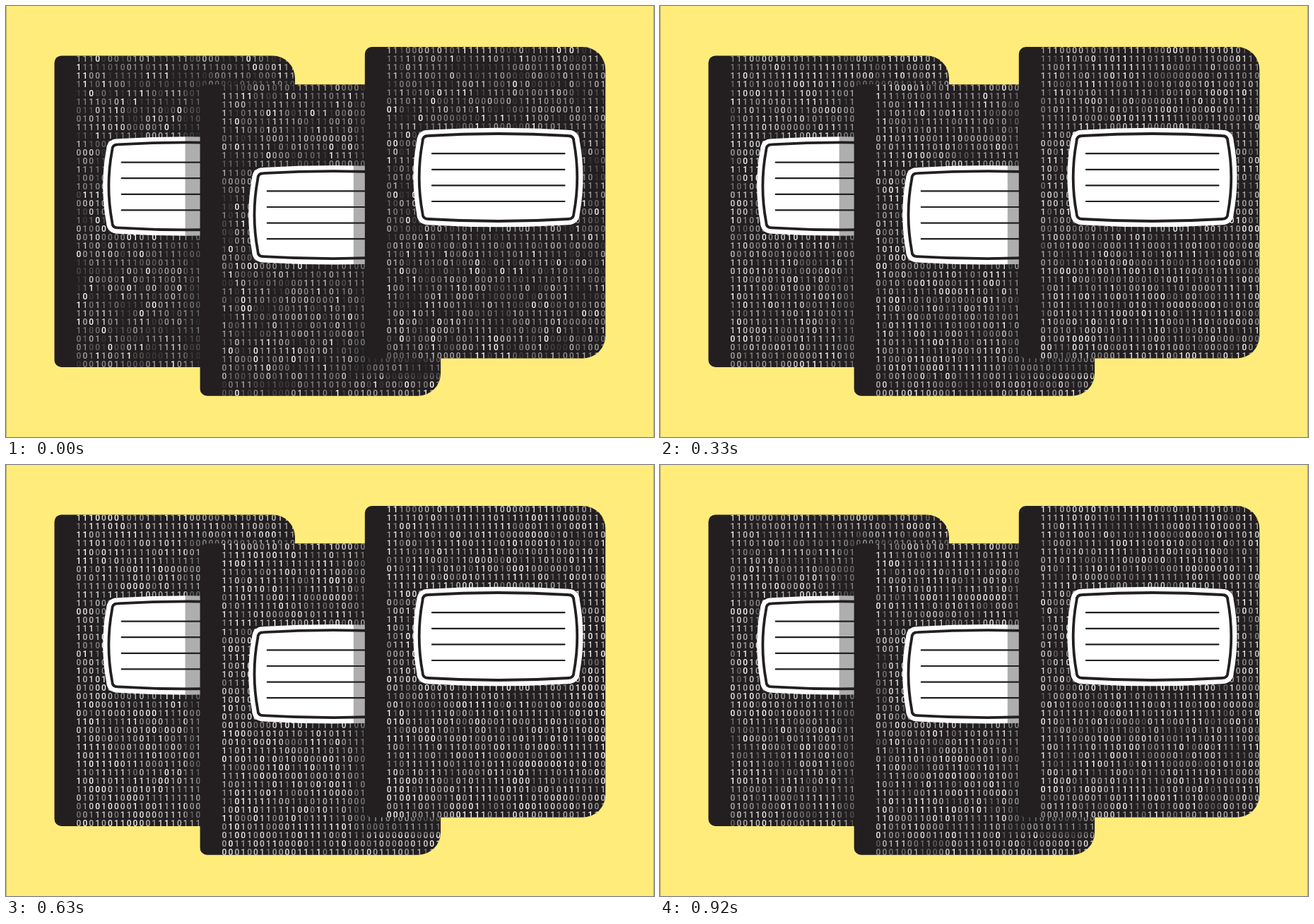
These frames come from a looping animation (917 px wide and 611 px high, 960 ms). An HTML page with a canvas:

```html
<!DOCTYPE html>
<html lang="en">
<head>
<meta charset="utf-8">
<title>Binary notebooks</title>
<style>
html, body { margin: 0; width: 100%; height: 100%; overflow: hidden; background: #ffec7b; }
canvas { display: block; width: 917px; height: 611px; }
</style>
</head>
<body>
<canvas id="stage" width="917" height="611"></canvas>
<script>
const LOOP = 960, STEPS = 23;
const COLS = 35, ROWS = 37, PITCH_X = 8.9, PITCH_Y = 12.03;
const INK = '#231f20', PAPER = '#ffec7b';
const BOOK_W = 340.5, BOOK_H = 441.5;
const ctx = document.getElementById('stage').getContext('2d');

const books = [
  { x: 68.5, y: 70.4, shade: 21 },
  { x: 274.6, y: 111.2, shade: 21 },
  { x: 507.8, y: 58, shade: 16 }
];

const cover = new Path2D();
cover.roundRect(0, 0, BOOK_W, BOOK_H, [10, 32, 32, 10]);
const label = barrel(188.7, 185, 107, 59, 8, 6);

// Rounded rectangle around (cx, cy) whose sides bulge outwards.
function barrel(cx, cy, w, h, r, bulge) {
  const p = new Path2D();
  const l = cx - w, t = cy - h, right = cx + w, b = cy + h;
  p.moveTo(l + r, t);
  p.quadraticCurveTo(cx, t - bulge, right - r, t);
  p.quadraticCurveTo(right, t, right, t + r);
  p.quadraticCurveTo(right + 1.6 * bulge, cy, right, b - r);
  p.quadraticCurveTo(right, b, right - r, b);
  p.quadraticCurveTo(cx, b + bulge, l + r, b);
  p.quadraticCurveTo(l, b, l, b - r);
  p.quadraticCurveTo(l - 1.6 * bulge, cy, l, t + r);
  p.quadraticCurveTo(l, t, l + r, t);
  p.closePath();
  return p;
}

// Repeatable random number in 0..1.
function rnd(a, b, c) {
  const n = Math.sin(a * 12.9898 + b * 78.233 + c * 37.719 + 4.1) * 43758.5453;
  return n - Math.floor(n);
}

// Random value that varies smoothly along a row.
function patch(col, row, seed) {
  const p = col / 3, i = Math.floor(p), f = p - i;
  const k = f * f * (3 - 2 * f);
  return rnd(i, row, seed) * (1 - k) + rnd(i + 1, row, seed) * k;
}

function makeCells(seed) {
  const cells = [];
  for (let r = 0; r < ROWS; r++) {
    for (let c = 0; c < COLS; c++) {
      cells.push({
        digit: patch(c, r, 9) + rnd(c, r, 10) < 1.04 ? '1' : '0',
        x: 34.4 + c * PITCH_X,
        y: 9 + r * PITCH_Y,
        phase: patch(c, r, seed) * 1.6,
        grain: rnd(c, r, seed + 20) - 0.5,
        spark: rnd(c, r, seed + 40) < 0.07
      });
    }
  }
  return cells;
}
books.forEach((b, i) => { b.cells = makeCells(i + 1); });

function drawDigits(cells, t) {
  const mean = 0.41 + 0.31 * Math.sin(2.5 * t / LOOP);
  const flash = Math.max(0, 1 - t / 200);
  ctx.font = '500 12px Roboto, "Liberation Sans", sans-serif';
  ctx.textAlign = 'center';
  ctx.fillStyle = '#fff';
  for (const c of cells) {
    const wave = Math.sin(2 * Math.PI * (t / LOOP + c.phase));
    let a = mean + 0.2 * wave + 0.4 * c.grain;
    if (c.spark) a += (1 - a) * flash;
    ctx.globalAlpha = Math.min(0.97, Math.max(0.12, a));
    ctx.fillText(c.digit, c.x, c.y);
  }
  ctx.globalAlpha = 1;
}

function drawLabel() {
  ctx.lineJoin = 'round';
  ctx.fillStyle = ctx.strokeStyle = '#fff';
  ctx.lineWidth = 16.5;
  ctx.stroke(label);
  ctx.fill(label);
  ctx.strokeStyle = INK;
  ctx.lineWidth = 3.8;
  ctx.stroke(label);
  ctx.lineWidth = 2.2;
  ctx.lineCap = 'round';
  ctx.beginPath();
  for (let i = 0; i < 4; i++) {
    const y = 151.2 + i * 22.6;
    ctx.moveTo(95.2, y);
    ctx.lineTo(282.7, y);
  }
  ctx.stroke();
}

function drawBook(book, above, t) {
  ctx.save();
  ctx.translate(book.x, book.y);
  ctx.fillStyle = INK;
  ctx.fill(cover);
  ctx.clip(cover);
  drawDigits(book.cells, t);
  drawLabel();
  if (above) {
    ctx.globalAlpha = 0.36;
    ctx.fillStyle = INK;
    ctx.fillRect(above.x - book.x - above.shade, above.y - book.y - 10, BOOK_W + above.shade, BOOK_H + 35);
  }
  ctx.restore();
}

function draw(t) {
  ctx.fillStyle = PAPER;
  ctx.fillRect(0, 0, 917, 611);
  ctx.fillStyle = '#b9ac66';
  ctx.fillRect(0, 0, 1, 611);
  ctx.fillRect(916, 0, 1, 611);
  books.forEach((b, i) => drawBook(b, books[i + 1], t));
}

const stepStart = i => 10 * Math.round(i * LOOP / STEPS / 10);
let shown = -1;

function tick() {
  const t = performance.now() % LOOP;
  let step = STEPS - 1;
  while (stepStart(step) > t) step--;
  if (step !== shown) {
    draw(stepStart(step));
    shown = step;
  }
  requestAnimationFrame(tick);
}
tick();
</script>
</body>
</html>
```
